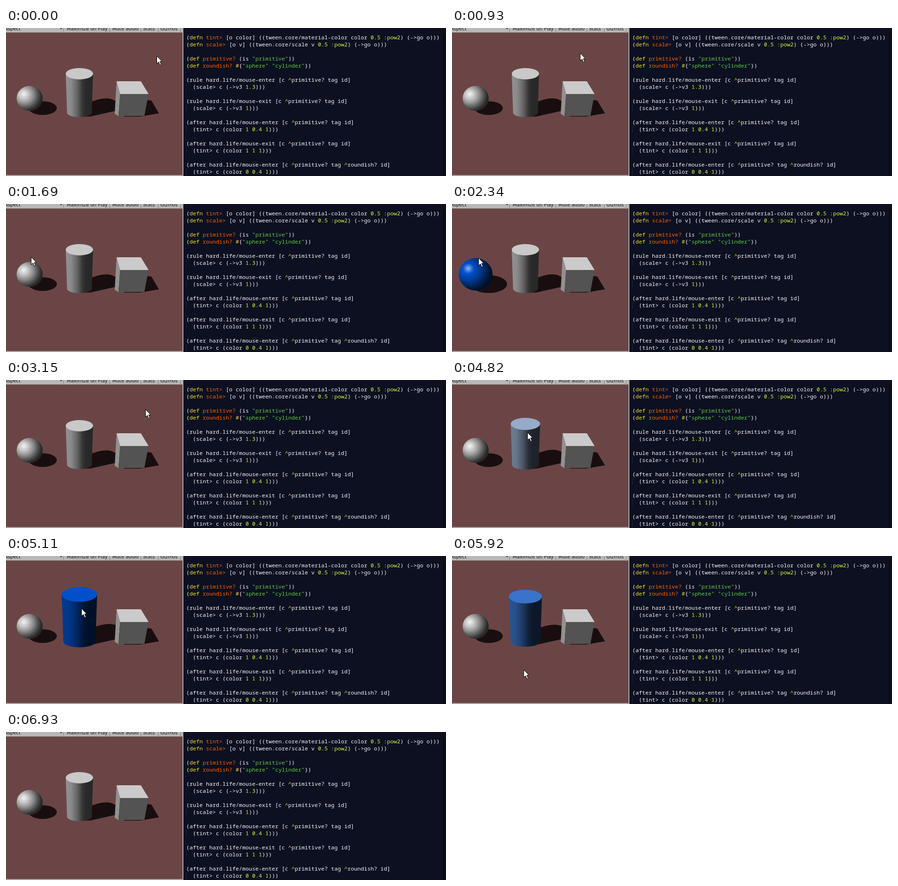
Animation of 935 by 314 pixels, one loop 8020 ms. Source, as an HTML page with a canvas:

```html
<!DOCTYPE html>
<html lang="en">
<head>
<meta charset="utf-8">
<title>Mouse tweens</title>
<style>
  html, body { margin: 0; width: 100%; height: 100%; overflow: hidden; background: #0c1021; }
  #stage { position: relative; width: 935px; height: 314px; overflow: hidden; }
  #view { position: absolute; left: 0; top: 0; width: 375px; height: 312px; background: #6b4545;
    border: solid #aaa; border-width: 0 2px 2px 0; }
  #bar { position: absolute; left: 0; top: 0; width: 375px; height: 9px; background: #b8b8b8;
    border-bottom: 1px solid #8a8484; overflow: hidden; }
  #bar span { position: absolute; top: -6px; font: 10px/15px "DejaVu Sans", sans-serif; color: #111; white-space: pre; }
  #bar i { position: absolute; top: 0; width: 1px; height: 9px; background: #858585; }
  #bar b { position: absolute; left: 115px; top: 0; border: solid transparent; border-width: 3px 2.5px 0; border-top-color: #333; }
  #gutter { position: absolute; left: 929px; top: 11px; width: 2px; height: 303px; background: #05070f; }
  pre { position: absolute; left: 383px; top: 12px; margin: 0; color: #f8f8f8;
    font: 11.667px/15px "Noto Sans Mono", "DejaVu Sans Mono", monospace; }
  .key { color: #fbde2d; } .name { color: #ff6400; } .num { color: #d8fa3c; } .str { color: #61ce3c; }
  .guide { box-shadow: inset 1px 0 #20253a; }
  canvas { position: absolute; left: 0; top: 0; }
</style>
</head>
<body>
<div id="stage">
  <div id="view"></div>
  <div id="bar">
    <span style="left:-3px">Aspect</span><b></b>
    <span style="left:129px">Maximize on Play</span>
    <span style="left:226px">Mute audio</span>
    <span style="left:291px">Stats</span>
    <span style="left:328px">Gizmos</span>
    <i style="left:122px"></i><i style="left:220px"></i><i style="left:286px"></i><i style="left:323px"></i><i style="left:370px"></i>
  </div>
  <div id="gutter"></div>
  <pre id="code">(defn tint> [o color] ((tween.core/material-color color 0.5 :pow2) (->go o)))
(defn scale> [o v] ((tween.core/scale v 0.5 :pow2) (->go o)))

(def primitive? (is "primitive"))
(def roundish? #{"sphere" "cylinder"})

(rule hard.life/mouse-enter [c ^primitive? tag id]
  (scale> c (->v3 1.3)))

(rule hard.life/mouse-exit [c ^primitive? tag id]
  (scale> c (->v3 1)))

(after hard.life/mouse-enter [c ^primitive? tag id]
  (tint> c (color 1 0.4 1)))

(after hard.life/mouse-exit [c ^primitive? tag id]
  (tint> c (color 1 1 1)))

(after hard.life/mouse-enter [c ^primitive? tag ^roundish? id]
  (tint> c (color 0 0.4 1)))</pre>
  <canvas id="scene" width="935" height="314"></canvas>
</div>
<script>
const LOOP = 8020, TWEEN = 450, SHADOW = '#190e0f';
const BLUE = [0, 0.4, 1], PINK = [1, 0.4, 1];
const ctx = document.getElementById('scene').getContext('2d');

const code = document.getElementById('code');
const tokens = /(?<str>"[^"]*")|(?<name>(?<=\(defn? )\S+)|(?<key>(?<=\()defn?\b|[\^#])|(?<num>:pow2|\b\d+(\.\d+)?(?=[ )]))|(?<guide>^ )/gm;
code.innerHTML = code.textContent.replace(tokens, (match, ...rest) => {
  const groups = rest.at(-1);
  const kind = Object.keys(groups).find(k => groups[k]);
  return `<span class="${kind}">${match}</span>`;
});

// Pointer path: time, x, y
const path = [
  [0, 320, 59], [20, 320, 59], [20.1, 304, 54], [49.9, 304, 54], [50, 291, 57], [540, 291, 57],
  [930, 273, 53], [1130, 150, 11], [1290, 34, 35], [1380, 34, 35], [1640, 50, 110], [1760, 56, 114],
  [2340, 56, 114], [2480, 88, 84], [2700, 121, 52], [3010, 121, 52], [3150, 296, 62], [3300, 275, 135],
  [3820, 275, 135], [3980, 262, 90], [4400, 200, 50], [4580, 167, 47], [4670, 167, 47], [4820, 160, 111],
  [5580, 160, 111], [5750, 155, 195], [5920, 152, 241], [6000, 150, 247], [6380, 150, 247],
  [6550, 338, 286], [6830, 338, 286], [6930, 507, 300]
];

const lerp = (a, b, k) => a + (b - a) * k;
const pow2 = k => k < 0.5 ? 2 * k * k : 1 - 2 * (1 - k) ** 2;
const tween = (t, start) => pow2(Math.min(1, Math.max(0, (t - start) / TWEEN)));
const hover = (t, enter, exit) => tween(t, enter) - tween(t, exit);
const shader = (tint, k) => grey => `rgb(${tint.map(c => Math.round(grey * lerp(1, c, k)))})`;

function addStops(gradient, stops, shade) {
  stops.forEach(([at, grey]) => gradient.addColorStop(at, shade(grey)));
  return gradient;
}

function ellipse(x, y, rx, ry, fill) {
  ctx.beginPath();
  ctx.ellipse(x, y, rx, ry, 0, 0, Math.PI * 2);
  ctx.fillStyle = fill;
  ctx.fill();
}

function polygon(points, fill) {
  ctx.beginPath();
  points.forEach(p => ctx.lineTo(...p));
  ctx.closePath();
  ctx.fillStyle = fill;
  ctx.fill();
}

function drawSphere(k) {
  const s = 1 + 0.3 * k;
  ellipse(78, 170, 30 * s, 14.5 * s, SHADOW);
  ctx.save();
  ctx.translate(50.3, 149.2);
  ctx.scale(s, s * 0.955);
  const body = ctx.createRadialGradient(-14, -9, 0, -10, -7, 38);
  addStops(body, [[0, 222], [0.25, 200], [0.5, 146], [0.75, 82], [0.93, 42], [1, 38]], shader(BLUE, k));
  ellipse(0, 0, 27.7, 27.7, body);
  const shine = ctx.createRadialGradient(-12, -10, 0, -12, -10, 9);
  shine.addColorStop(0, 'rgba(255,255,255,.6)');
  shine.addColorStop(0.4, 'rgba(255,255,255,.32)');
  shine.addColorStop(1, 'rgba(255,255,255,0)');
  ellipse(-12, -10, 9, 9, shine);
  ctx.restore();
}

function drawCylinder(k) {
  const s = 1 + 0.3 * k, x = 156, shade = shader(BLUE, k);
  const topY = 148 - 51 * s, baseY = 180 + 6 * (s - 1);

  ctx.save();
  ctx.translate(170, 183);
  ctx.scale(lerp(1, s, 0.5), lerp(1, s, 0.5));
  ctx.beginPath();
  ctx.moveTo(-5, 5);
  ctx.lineTo(10, -26);
  ctx.bezierCurveTo(30, -34, 50, -38, 64, -27);
  ctx.bezierCurveTo(72, -20, 72, -10, 62, -7);
  ctx.lineTo(8, 5);
  ctx.fillStyle = SHADOW;
  ctx.fill();
  ctx.restore();

  const side = ctx.createLinearGradient(x - 29 * s, 0, x + 29 * s, 0);
  addStops(side, [[0, 146], [0.2, 137], [0.42, 100], [0.62, 52], [0.75, 41], [1, 40]], shade);
  ctx.beginPath();
  ctx.moveTo(x - 29 * s, topY);
  ctx.lineTo(x + 29 * s, topY);
  ctx.lineTo(x + 26.2 * s, baseY);
  ctx.ellipse(x, baseY, 26.2 * s, 9.2 * s, 0, 0, Math.PI);
  ctx.fillStyle = side;
  ctx.fill();
  ellipse(x, topY, 29 * s, 12 * s, shade(201));
}

function drawCube(k) {
  const s = 1 + 0.3 * k, shade = shader(PINK, k);
  const around = cy => (x, y) => [267 + (x - 267) * s, cy + (y - cy) * s];
  const upper = around(157), floor = around(168);
  const backLeft = upper(235, 113), backRight = upper(286.5, 113);
  const right = upper(303, 140), left = upper(242.5, 140);
  const baseLeft = floor(231, 182), baseFront = floor(239, 187), baseRight = floor(294, 186.5);

  polygon([floor(250, 188), floor(290, 151), floor(309, 154), floor(325, 181), floor(285, 188)], SHADOW);
  polygon([backLeft, left, baseFront, baseLeft], shade(145));
  polygon([left, right, baseRight, baseFront], shade(83));
  polygon([backLeft, backRight, right, left], shade(203));
}

function drawPointer(t) {
  if (t >= 6930) return;
  const i = path.findIndex(p => p[0] > t);
  const [t0, x0, y0] = path[i - 1], [t1, x1, y1] = path[i];
  const k = (t - t0) / (t1 - t0);
  ctx.save();
  ctx.translate(Math.round(lerp(x0, x1, k)) + 0.5, Math.round(lerp(y0, y1, k)) + 0.5);
  polygon([[0, 0], [0, 16], [4, 12.5], [6.5, 19], [9.3, 18], [6.5, 11.5], [11, 11.5]], '#fff');
  ctx.lineWidth = 1;
  ctx.strokeStyle = '#000';
  ctx.stroke();
  ctx.restore();
}

function render() {
  const t = performance.now() % LOOP;
  ctx.clearRect(0, 0, 935, 314);
  drawSphere(hover(t, 1660, 2380));
  drawCylinder(hover(t, 4660, 5750));
  drawCube(hover(t, 3240, 3980));
  drawPointer(t);
  requestAnimationFrame(render);
}
render();
</script>
</body>
</html>
```
